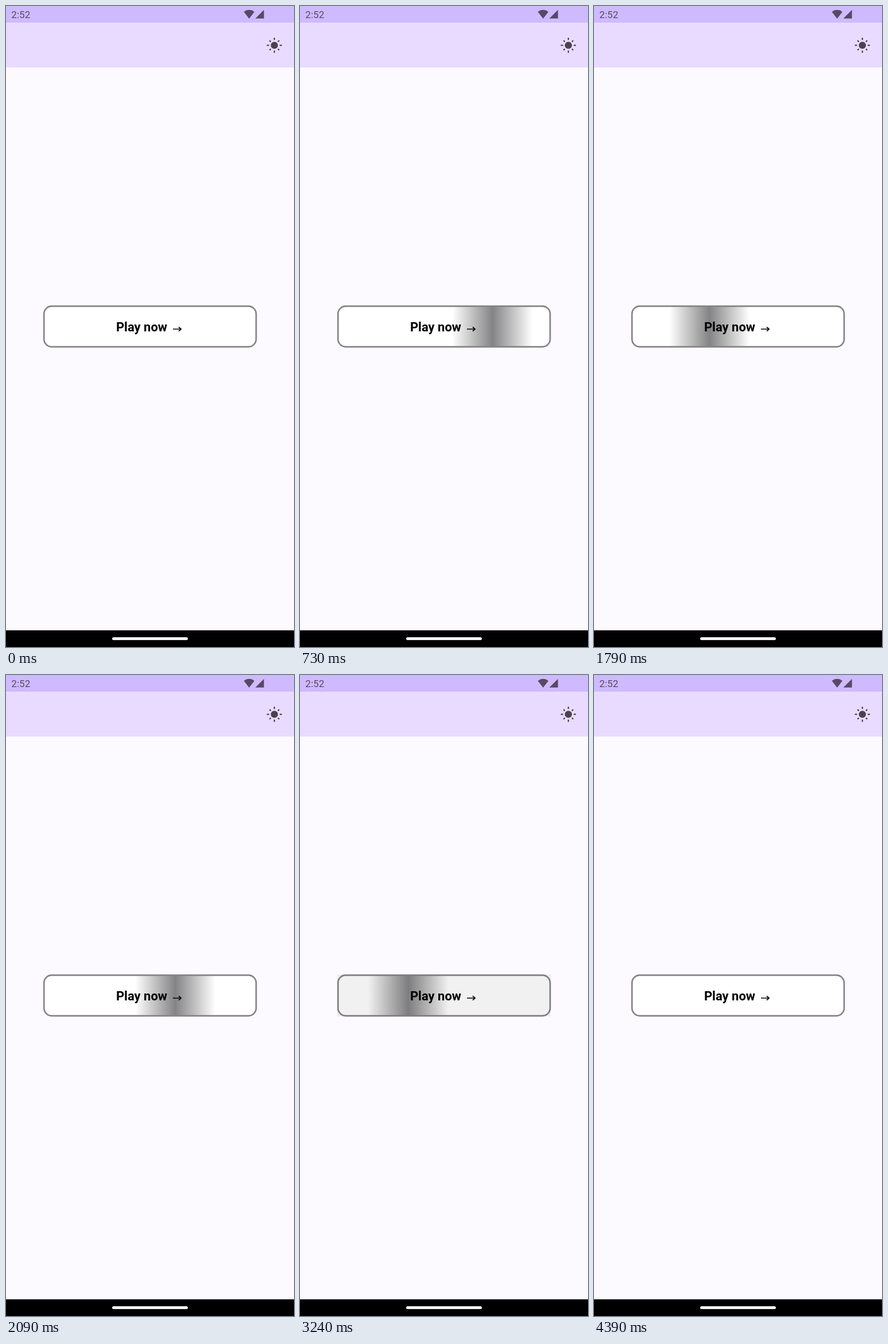
These frames come from a looping animation (502 by 1115 pixels, 4420 ms). An HTML page:

```html
<!DOCTYPE html>
<html lang="en">
<head>
<meta charset="utf-8">
<title>Shimmer button</title>
<style>
  html, body { margin: 0; width: 100%; height: 100%; overflow: hidden; background: #fcfafe; }
  svg { display: block; width: 100%; height: 100%; }
  text { font-family: Roboto, sans-serif; }
</style>
</head>
<body>
<svg viewBox="0 0 502 1115">
  <defs>
    <linearGradient id="shine" gradientUnits="userSpaceOnUse" x1="0" x2="139.5" y1="0" y2="0">
      <stop offset="0" stop-color="#fff"/>
      <stop offset=".5" stop-color="#848385"/>
      <stop offset="1" stop-color="#fff"/>
    </linearGradient>
    <clipPath id="bounds"><rect x="65" y="521" width="372" height="73"/></clipPath>
  </defs>

  <rect width="502" height="1115" fill="#fcfafe"/>
  <rect width="502" height="107" fill="#e9dbff"/>
  <rect width="502" height="29" fill="#cfbaff"/>

  <g fill="#574966">
    <text x="9.3" y="21.4" font-size="17.1">2:52</text>
    <path d="M423.8 22L414.7 10.2Q418.5 6.8 423.8 6.8T432.9 10.2Z"/>
    <path d="M434.6 21.8L449.6 6.8V21.8Z"/>
  </g>

  <g id="sun" transform="translate(467.8 68.4)" stroke="#4a424f" stroke-width="2.3" stroke-linecap="round">
    <circle r="6.2" fill="#4a424f" stroke="none"/>
  </g>

  <rect x="66.2" y="522.2" width="369.8" height="70.6" rx="13.5" fill="url(#shine)" stroke="#848385" stroke-width="2.7"/>
  <circle id="ripple" cx="251" cy="557.5" clip-path="url(#bounds)" fill="#1c1b1f"/>
  <text x="191.9" y="566" font-size="22" font-weight="700">Play now</text>
  <path d="M291 562H305M301 558.3L305.2 562L301 565.7" fill="none" stroke="#000" stroke-width="1.7"/>

  <rect y="1086" width="502" height="29"/>
  <rect x="185" y="1098" width="132" height="5" rx="2.5" fill="#f6f3f6"/>
</svg>
<script>
const LOOP = 4420;
const SWEEP = { first: 88, period: 1490, left: 65, travel: 465 };
const PRESS = { down: 2840, grow: 225, up: 3165, fade: 150, alpha: 0.12 };

const $ = id => document.getElementById(id);
const clamp = v => Math.min(1, Math.max(0, v));

for (let i = 0; i < 8; i++) {
  const ray = document.createElementNS('http://www.w3.org/2000/svg', 'path');
  ray.setAttribute('d', i % 2 ? 'M9.6 0H11' : 'M10.2 0H12.2');
  ray.setAttribute('transform', `rotate(${i * 45})`);
  $('sun').append(ray);
}

function draw(t) {
  const phase = ((t - SWEEP.first) / SWEEP.period + 1) % 1;
  $('shine').setAttribute('gradientTransform', `translate(${SWEEP.left + SWEEP.travel * phase} 0)`);

  const grow = clamp((t - PRESS.down) / PRESS.grow);
  const fadeIn = clamp((t - PRESS.down) / 75);
  const fadeOut = 1 - clamp((t - PRESS.up) / PRESS.fade);
  $('ripple').setAttribute('r', 110 + 90 * (1 - (1 - grow) ** 2));
  $('ripple').setAttribute('opacity', PRESS.alpha * fadeIn * fadeOut);
}

const start = performance.now();
function tick() {
  draw((performance.now() - start) % LOOP);
  requestAnimationFrame(tick);
}
tick();
</script>
</body>
</html>
```
